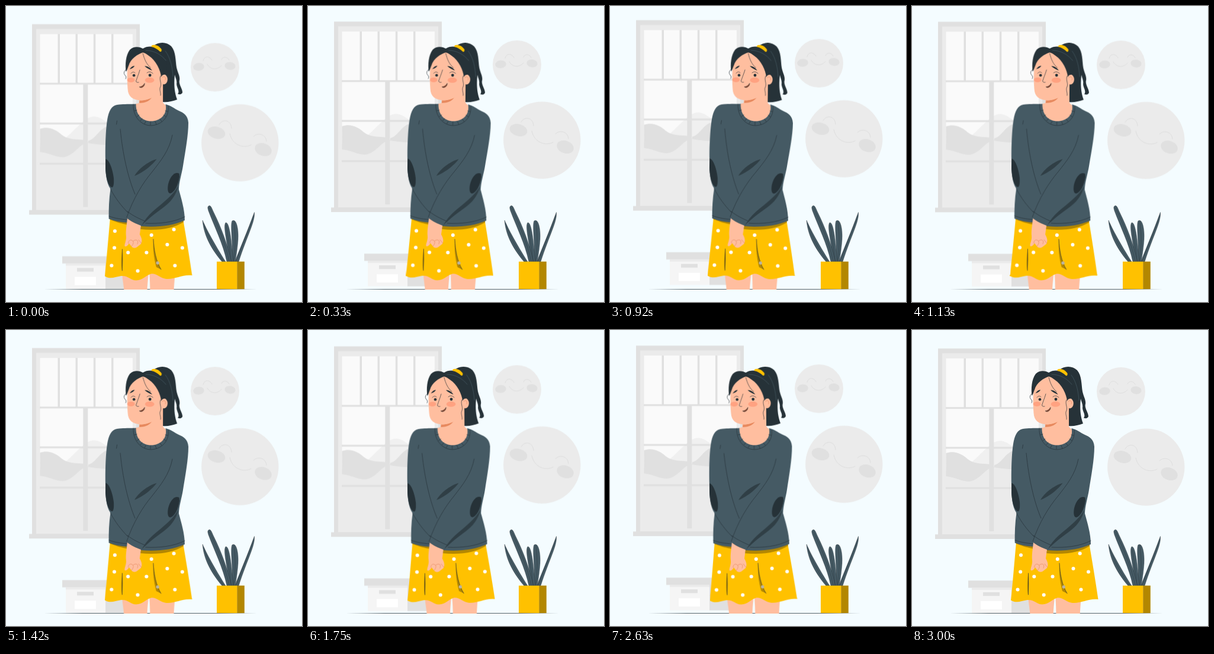
An HTML page without scripts for the animation above (3040 ms loop, 500 by 500 pixels).

```html
<!DOCTYPE html>
<html lang="en">
<head>
<meta charset="utf-8">
<title>Shy woman</title>
<style>
  html, body { margin: 0; width: 100%; height: 100%; overflow: hidden; background: #f4fcff; }
  svg { display: block; width: 100%; height: 100%; }
  .float { animation: float 1520ms linear -40ms infinite; }
  .sway { transform-origin: 241px 270px; animation: sway 3040ms linear -40ms infinite; }
  @keyframes float { 50% { transform: translateY(-10px); } }
  @keyframes sway {
    25% { transform: rotate(1deg); }
    75% { transform: rotate(-1deg); }
  }
  .g1 { fill: #e0e0e0; }
  .g2 { fill: #ebebeb; }
  .g3 { fill: #fafafa; }
  .dark { fill: #263238; }
  .knit { fill: #455a64; }
  .fold { fill: #303f46; }
  .skin { fill: #ffbe9f; }
  .gold { fill: #ffc100; }
  .shade { fill: #b38700; }
  .line { fill: none; stroke: #263238; stroke-width: .7; stroke-linecap: round; stroke-linejoin: round; }
  .warm { stroke: #e58a62; }
  .strand { stroke: #536a75; }
  .faint { fill: none; stroke: #dcdcdc; stroke-width: .9; stroke-linecap: round; }
</style>
</head>
<body>
<svg viewBox="0 0 500 500">
  <defs>
    <clipPath id="ground"><rect width="500" height="478.500"/></clipPath>
    <circle id="dot" r="3" fill="#fff"/>
  </defs>

  <g class="float">
    <!-- window -->
    <path class="g1" d="M44 31.300h182v316H44z"/>
    <path class="g2" d="M51 39.300h169v306H51z"/>
    <path class="g3" d="M57.500 48h156.500v190H57.500z"/>
    <path fill="#f0f0f0" d="M100 224C112 214 118 206 126 200C138 187 150 182 166 194C182 204 195 209 214 208V266H100z"/>
    <path class="g2" d="M57.500 236C90 246 110 234 130 230C160 230 190 232 214 230V342H57.500z"/>
    <path class="g1" d="M57.500 208C72 203 84 209 94 218C106 227 118 225 134 227L139 232C126 232 120 246 106 253C91 261 80 250 57.500 247z"/>
    <path class="g1" d="M139 228C150 226 156 211 168 205C180 202 195 212 214 214V236C185 236 160 236 139 232z"/>
    <path class="g1" d="M87.500 48h3.500v83h-3.500zM117.500 48h3.500v83h-3.500zM147.800 48h3.500v83h-3.500zM178 48h3.500v83h-3.500z"/>
    <path class="g1" d="M57 130.200h158v3H57zM57 197.600h158v3H57zM57 265.600h158v3H57zM130.300 132h8v208h-8z"/>
    <path class="g1" d="M39 345.300h192v7.700H39z"/>

    <!-- smiling discs -->
    <circle class="g2" cx="353" cy="104" r="41"/>
    <g class="g1">
      <ellipse cx="325.500" cy="103.300" rx="9.300" ry="6.500" transform="rotate(-6 325.500 103.300)"/>
      <ellipse cx="378.500" cy="101.800" rx="9.200" ry="6.600" transform="rotate(8 378.500 101.800)"/>
    </g>
    <path class="faint" d="M333 93C335 85 343 84 348 92M364 91C367 85 374 86 377 92M340 99C346 109 357 109 364 101"/>
    <circle class="g2" cx="395.300" cy="231.600" r="65.200"/>
    <g class="g1">
      <ellipse cx="355.500" cy="214.500" rx="15" ry="10" transform="rotate(14 355.500 214.500)"/>
      <ellipse cx="434.500" cy="243" rx="14.500" ry="10.500" transform="rotate(20 434.500 243)"/>
    </g>
    <path class="faint" d="M360 201C365 191 380 192 381 207M418 221C424 214 439 216 440 229M378 216C382 236 402 242 414 235"/>

    <!-- carton -->
    <path fill="#f5f5f5" d="M101 435h68v43.500h-68z"/>
    <path class="g1" d="M168 435h57v43.500h-57z"/>
    <path class="g2" d="M101 436h67v3h-67z"/>
    <path class="g1" d="M95 423.300h130v12.300H95zM120 443h28v6.300h-28z"/>
    <path fill="#fff" d="M116 458h36v14h-36z"/>
  </g>

  <!-- plant -->
  <g class="knit" stroke="#263238" stroke-width=".4">
    <path d="M332 362C338 376 352 402 371 432H365C343 406 334 384 332 362z"/>
    <path d="M419.500 348.500C421 364 408 386 393 432H386.500C396 408 408 380 419.500 348.500z"/>
    <path d="M382 363C390 358 393 380 392 394C391 408 389 422 387 432H381C385 410 378 371 382 363z"/>
    <path d="M371 366C378 364 381 400 384 432H377C375 402 366 373 371 366z"/>
    <path d="M342 338C346 335 348 343 351 349C363 373 374 402 381 432H373C367 402 352 373 342 346C341 342 340 340 342 338z"/>
  </g>
  <path class="line" stroke-width=".4" style="stroke-width:.4" d="M344 341C358 371 370 400 377 431M372 370C375 390 378 410 380 431M385 364C388 390 388 410 384 431M418 354C408 382 398 405 389 431M334 367C341 390 352 410 367 431"/>
  <path class="gold" d="M356 431.700h34.500v46.500H356z"/>
  <path class="shade" d="M390.300 431.700h12.500v46.500h-12.500z"/>
  <path class="dark" d="M64 478.300L130 478H350L424 478.300L350 478.700H130z"/>

  <g clip-path="url(#ground)">
  <g class="sway">
    <!-- legs -->
    <path class="skin" d="M196 450H241C240 462 239 470 238.500 485H200C199 472 197 462 196 450zM242 448H286C285 462 284 472 283.500 485H243.500C243.500 472 243 460 242 448z"/>

    <!-- skirt -->
    <path class="gold" d="M176 358C173 392 170 428 167 456.500C176 462 184 458 195 456C206 455 210 463 220 463.500C232 463 236 455 245 452.500C255 451 260 460 271 461C286 462 298 453 314.500 455C310 424 305 394 299.500 362z"/>
    <path class="shade" d="M176 358L205 364L230 369L300 361V365C282 376 258 380 226 377L203 369C192 367 184 364 175.500 361z"/>
    <use href="#dot" x="184" y="380.300"/><use href="#dot" x="283.700" y="377.500"/>
    <use href="#dot" x="245.800" y="387"/><use href="#dot" x="183.200" y="408.500"/>
    <use href="#dot" x="272.500" y="403"/><use href="#dot" x="298" y="408.500"/>
    <use href="#dot" x="206.300" y="416.500"/><use href="#dot" x="237.500" y="416.500"/>
    <use href="#dot" x="178.500" y="438.500"/><use href="#dot" x="222.700" y="447.500"/>
    <use href="#dot" x="285.500" y="438.500"/>
    <path class="shade" d="M249 394C250 412 253 430 262 445L254 441C250 426 248 410 249 394zM196.500 410C198 422 198 436 196 448C194 436 195 422 196.500 410z"/>
    <path class="line" d="M249 394C250 412 253 430 262 445M196.500 411V447"/>
    <circle cx="256.300" cy="434" r="2.700" fill="#b9b3a2"/>

    <!-- ponytail -->
    <path class="dark" d="M248 68C257 60 271 60 279 68C287 77 286 92 288 104C290 113 294 118 293 125C291 132 298 139 298 146C297 149 294 150 290 148.500C294 143 288 138 288 131C289 126 286 121 285 116C283 134 285 148 289 158C281 161 272 163 264.500 162L262 110z"/>

    <!-- neck -->
    <path class="skin" d="M225 152L265 130V163C267 166 270 167 271 170C272 188 258 197 245 197C230 197 219 186 219 165.500L224.500 164z"/>
    <path fill="#e7895e" d="M225.500 159.500C234 160 242 157 247.500 152C244 160 236 164 225 164z"/>

    <!-- sweater -->
    <path class="knit" d="M219.500 165.500C208 166 200 165.500 191 166.500C180 167 175 174 172 187C168.500 203 167.500 235 168 260C168 282 169 298 176.500 309C174 326 173.500 343 173.700 359.500C183 363 194 365.500 205 366L229 372C254 374 282 371.500 302 362C302 344 296 325 292 310C292 298 297 283 299 270C303 245 308 218 308 197C307 184 299 180 292 177C284 173 278 168 269.500 166C273 184 260 194.500 245 194.500C230 194.500 219 184 219.500 165.500z"/>
    <path class="line" d="M215 166C214 187 228 202 245 202C262 201 276 189 274 169"/>
    <path class="line" stroke-width=".6" d="M217 177l4-1M221 187l4-3M227 194l3-4M234 199l2-4M244 201v-5M254 200l-2-5M263 195l-3-4M270 187l-4-3M273 178l-4-1"/>
    <path class="line" d="M193 208C197 250 206 290 218 318M281 218C276 244 261 262 247 280C231 299 215 325 204 357M176.500 309C184 324 195 338 206 349M186.500 200L187.500 194M205 347C215 355 227 360 236 364M174 355C184 359 194 360 204 361M236 367C258 368 282 366 302 356"/>
    <path class="fold" d="M217 287C223 276 239 263 254.500 258.500C248 268 231 282 217 287z"/>
    <path class="dark" d="M168 258.500C174 259 180 275 182 291C182.500 299 182 306 179 306.500C173 305 168.500 290 168 274z"/>
    <path class="dark" d="M292.500 283C286 279 277 287 274 301C272 311 274 317 278 316.500C285 314 291 303 293 288z"/>
    <path class="fold" d="M291 304C282 320 264 333 248 347C240 354 234 362 229 371C243 356 259 346 270 337C281 328 288 317 291 304z"/>

    <!-- hands -->
    <path class="skin" d="M205 359C211 364 220 368 228 371L226 386C229 391 231 397 228 402L223 406C220 409 215 410 212 406L208 401C206 404 204 407 201 406C199 404 204 396 203 389C202 380 204 370 205 359z"/>
    <path class="line warm" d="M207 401C206 397 210 394 213 396C217 398 215 403 212 406M215 397C220 393 225 396 222 402M224 395L229 401"/>

    <!-- head -->
    <ellipse class="skin" cx="266.500" cy="124" rx="6.300" ry="8.500"/>
    <path class="skin" d="M208 86C204 102 204 120 205.500 140C206 153 214 159 228 159.500C242 159 256 152 264 140L268 112L250 80L226 75z"/>
    <path class="dark" d="M231 78.500C223 81 210 89 207 101C205 106 204 110 202.500 111C201 99 202 83 209 74C216 67 226 69 231 72C238 67 248 68 256 71C267 75 273 90 272 103C272 110 270 115 267 116C264 116 263 118 262 120C261 108 253 92 241 84C237 81 234 79 231 78.500z"/>
    <path class="gold" d="M245.500 67C249 64 258 66 262.500 73C263 76 262 78 260 77C256 73 251 70 245.500 69z"/>
    <path class="line strand" style="stroke-width:.5" d="M236 75C250 75 262 82 270 92M269 76C278 88 281 104 282 119"/>
    <path class="line" d="M231 80C234 91 237 98 244 104M203 107C199 110 198 114 201 117C203 119 203 121 202 123M261 118C258 124 263 130 261 136C258 141 262 146 261 151"/>
    <path class="line warm" d="M264 121C267 117 271 121 269 125"/>
    <g fill="#ff8c69" opacity=".55">
      <ellipse cx="211" cy="125" rx="6.300" ry="4"/>
      <ellipse cx="242.500" cy="125.300" rx="7.800" ry="4.500"/>
    </g>
    <path class="dark" d="M208.500 107C211 103 214 101 217 101C216 104 212 106 208.500 107zM234 101.500C239 101.500 244 104 246.500 109C242 107 237 105 234 101.500z"/>
    <circle class="dark" cx="216" cy="117.300" r="2.300"/>
    <circle class="dark" cx="243" cy="117" r="2.400"/>
    <path class="line" d="M211 114C213 111 216 111 218 113M238 113C241 110 245 111 248 114M226 108C224 115 221 122 219.500 127C220 129 222 129.500 224 129"/>
    <path fill="#8e4b32" stroke="#263238" stroke-width=".5" d="M225 136.500C229 136.500 232 134 234 130.500C234.500 134 232 137 228.500 138C227 138 226 137.500 225 136.500z"/>
  </g>
  </g>
</svg>
</body>
</html>
```
